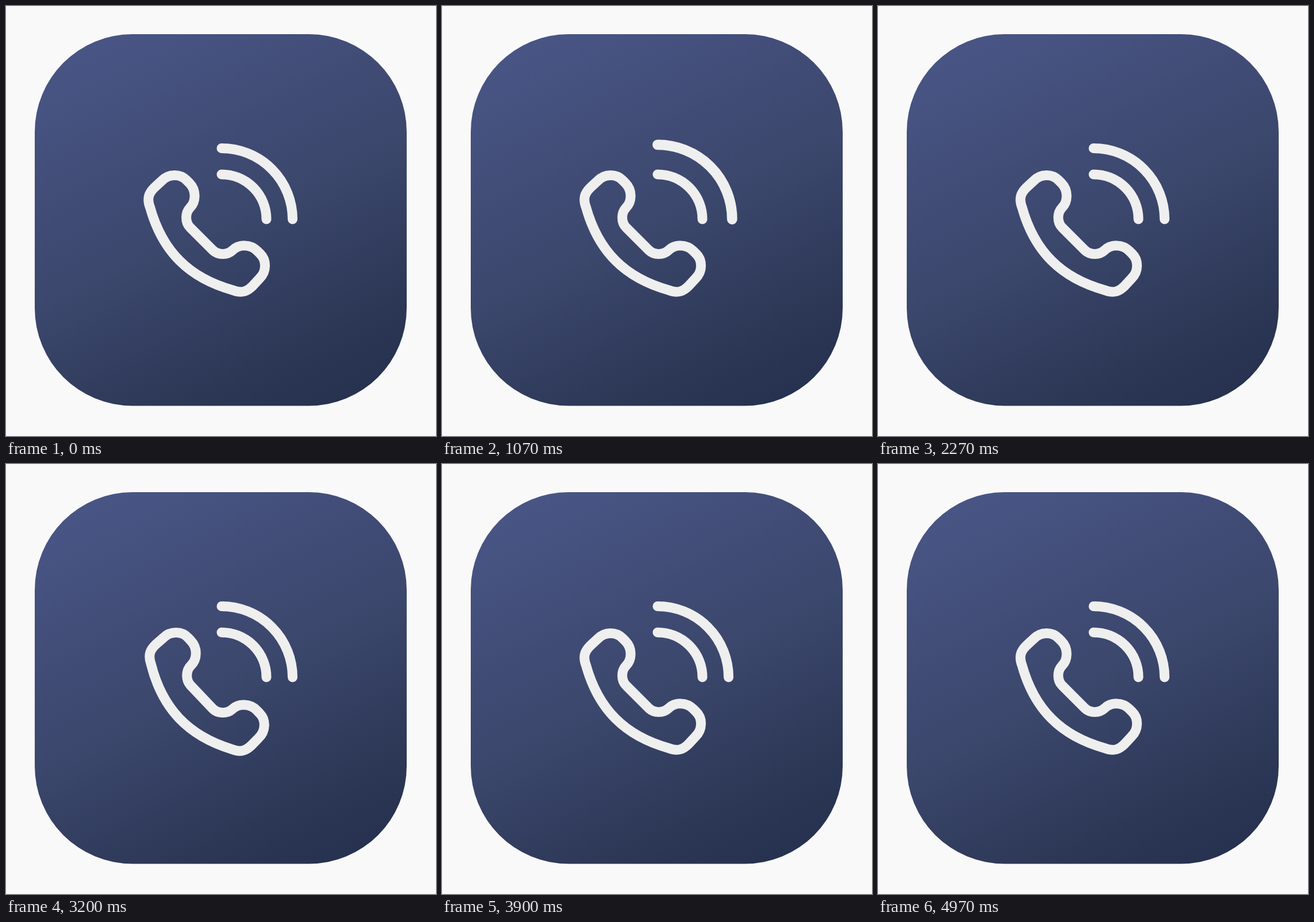
An HTML page that plays this animation: 748x748 px, repeating every 5.01 s.

```html
<!DOCTYPE html>
<html lang="en">
<head>
<meta charset="utf-8">
<title>Ringing phone</title>
<style>
  html, body { margin: 0; width: 100%; height: 100%; overflow: hidden; background: #f9f9f9; }
  svg { display: block; width: 100vw; height: 100vh; }
  .line { fill: none; stroke: #efefef; stroke-width: 17; stroke-linecap: round; stroke-linejoin: round; }
</style>
</head>
<body>
<svg viewBox="0 0 748 748">
  <defs>
    <linearGradient id="tile" gradientUnits="userSpaceOnUse" x1="59" y1="120" x2="381" y2="781">
      <stop offset="0" stop-color="#485584"/>
      <stop offset=".22" stop-color="#434e7a"/>
      <stop offset=".5" stop-color="#3b476c"/>
      <stop offset=".88" stop-color="#2b3654"/>
      <stop offset="1" stop-color="#263250"/>
    </linearGradient>
  </defs>
  <rect x="50" y="49" width="647" height="646.5" rx="170" fill="url(#tile)"/>
  <g class="line">
    <path id="phone" d="M250.5 350C244.5 334 249 325 258 316L271 304C283 291.5 303 291.5 314 303L319 308
      C331 320 331 340 320 351C311.5 360 311.5 376 320 385L360 425C369 433.5 385 433.5 394 425
      C405 414 425 414 437 426L442 431C453.5 442 453.5 462 441 474L429 487C420 496 411 500.5 395 494.5
      C318 473 272 427 250.5 350Z"/>
    <path id="inner" d="M375 293A78 78 0 0 1 453 371"/>
    <path id="outer" d="M375 247.5A123.5 123.5 0 0 1 498.5 371"/>
  </g>
</svg>
<script>
  const LOOP = 5010, STEP = 100 / 3;
  const RINGS = [470, 1530, 3130, 4230];   // ms at which each ring first moves

  // [step, value] keys, linear between them
  const TILT = [[0, 0], [2, 4.7], [5, -4.7], [8, 4.7], [11, -4.7], [14, 4.7], [16, 0]];
  const INNER = [[4, 1], [8, .95], [15, 1.05], [19, 1]];
  const OUTER = [[8, 1], [12, .95], [19, 1.05], [23, 1]];

  const el = id => document.getElementById(id);
  const phone = el('phone'), inner = el('inner'), outer = el('outer');

  function valueAt(keys, k) {
    if (k <= keys[0][0]) return keys[0][1];
    for (let i = 1; i < keys.length; i++) {
      const [k0, v0] = keys[i - 1], [k1, v1] = keys[i];
      if (k <= k1) return v0 + (v1 - v0) * (k - k0) / (k1 - k0);
    }
    return keys[keys.length - 1][1];
  }

  const scaleArc = (arc, s) =>
    arc.setAttribute('transform', `translate(375 371) scale(${s}) translate(-375 -371)`);

  function draw(t) {
    const first = RINGS.filter(r => r <= t).pop();
    const k = first === undefined ? 0 : Math.floor((t - first) / STEP + .15) + 1;
    phone.setAttribute('transform', `rotate(${valueAt(TILT, k)} 337 409)`);
    scaleArc(inner, valueAt(INNER, k));
    scaleArc(outer, valueAt(OUTER, k));
  }

  const start = performance.now();
  function tick() {
    draw((performance.now() - start) % LOOP);
    requestAnimationFrame(tick);
  }
  tick();
</script>
</body>
</html>
```
